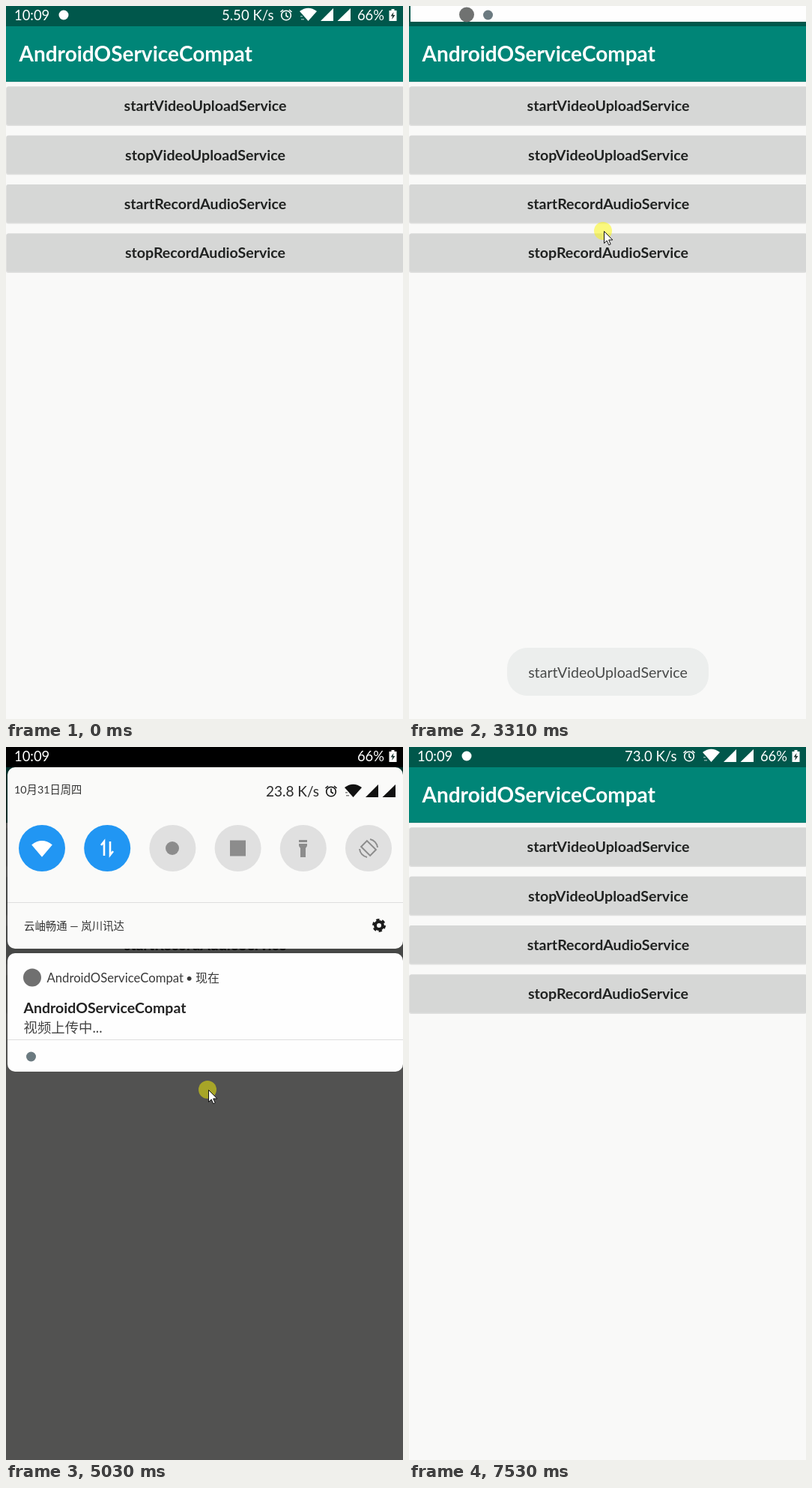
Recreate the animation shown at these times as an HTML page. Size 530x951 px, loop 8090 ms.

```html
<!DOCTYPE html>
<html lang="zh">
<head>
<meta charset="utf-8">
<style>
  html, body { margin: 0; width: 100%; height: 100%; overflow: hidden; background: #f9f9f8; }
  svg { display: block; width: 530px; height: 951px; }
  text { font-family: Lato, "Noto Sans CJK SC", "Noto Sans CJK", sans-serif; white-space: pre; }
  .bold { font-weight: 700; }
  .mid { text-anchor: middle; }
  .end { text-anchor: end; }
</style>
</head>
<body>
<svg viewBox="0 0 530 951" xmlns="http://www.w3.org/2000/svg">
  <defs>
    <path id="fan" d="M0 8.5L-11.5 -4.5Q0 -13 11.5 -4.5Z"/>
    <g id="signals">
      <g fill="none" stroke="currentColor" stroke-width="1.6">
        <circle cx="374" cy="12.5" r="6.3"/>
        <path d="M374 8.5V13L377 15M366.5 8L370 5M381.5 8L378 5"/>
      </g>
      <g fill="currentColor">
        <use href="#fan" x="403.5" y="11.5"/>
        <path d="M437 3V20H420ZM460 3V20H442.5Z"/>
        <path d="M393 13h3v1.5h-3zM394 17h4v1.5h-4z" opacity=".5"/>
      </g>
    </g>
    <g id="statusEnds" fill="#fff">
      <text x="11" y="19" font-size="18.4">10:09</text>
      <text x="505" y="19" font-size="18.4" class="end">66%</text>
      <path d="M514.5 4h4v2h3v14h-10V6h3z"/>
      <path d="M517.5 8l-4 5.5h2.5l-.8 4.500 4.300-6h-2.700z" fill="#243b37"/>
    </g>
    <clipPath id="buttonClip"><rect id="clipRect" x="1" width="530" height="51" rx="2"/></clipPath>
  </defs>

  <rect width="530" height="951" fill="#f9f9f8"/>
  <rect width="530" height="101" fill="#008577"/>
  <rect y="100" width="530" height="2" fill="#000" opacity=".08"/>
  <rect width="530" height="27" fill="#00574b"/>
  <text x="17.500" y="74" font-size="28" class="bold" fill="#fff">AndroidOServiceCompat</text>
  <g id="buttons"></g>
  <circle id="ripple" clip-path="url(#buttonClip)"/>

  <g id="toast">
    <rect x="131" y="856" width="269" height="64" rx="27" fill="#eceeed"/>
    <text x="265.500" y="896" font-size="19.600" class="mid" fill="#484a49">startVideoUploadService</text>
  </g>

  <g id="status">
    <use href="#statusEnds"/>
    <circle id="serviceIcon" cx="77" cy="12" r="9.500" fill="#12907f"/>
    <circle id="appIcon" cy="12" r="6.500" fill="#fff"/>
    <text id="speed" x="357.500" y="19" font-size="18.600" class="end" fill="#fff"></text>
    <use href="#signals" color="#fff"/>
  </g>

  <g id="strip">
    <rect width="530" height="27" fill="#00574b"/>
    <rect x="2" y="-8" width="528" height="29" fill="#fefefe"/>
    <circle cx="77" cy="11.500" r="10" fill="#707271"/>
    <circle cx="105.500" cy="12" r="6.500" fill="#6b7a80"/>
  </g>

  <rect id="dim" width="530" height="951"/>
  <g id="panel">
    <rect x="2" y="27" width="528" height="242" rx="10" fill="#fafaf9"/>
    <text x="11" y="61.500" font-size="14.300" fill="#333">10月31日周四</text>
    <text x="418" y="66" font-size="19" class="end" fill="#2a2a2a">23.8 K/s</text>
    <use href="#signals" x="60" y="47" color="#111"/>
    <g id="tiles"></g>
    <use href="#fan" transform="translate(48 136) scale(1.200 1.250)" fill="#fff"/>
    <path d="M131 145V126L127 131M139 126V144L143 139" fill="none" stroke="#fff" stroke-width="2.600"/>
    <g fill="#8c8c8c">
      <circle cx="222" cy="135" r="9"/>
      <rect x="299" y="124.500" width="21" height="21"/>
      <path d="M391 124h11v3h-11zM391 129h11v3l-2 3v12h-7v-12l-2-3z"/>
    </g>
    <g fill="none" stroke="#8c8c8c" stroke-width="2">
      <rect x="478.500" y="126.500" width="11" height="17" transform="rotate(-45 484 135)"/>
      <path d="M486 123A12.500 12.500 0 0 1 496 134M482 147A12.500 12.500 0 0 1 472 136"/>
    </g>
    <path d="M2 207.500H530" stroke="#dedede"/>
    <text x="24" y="243.500" font-size="14.400" fill="#333">云岫畅通 — 岚川讯达</text>
    <g fill="none" stroke="#1c1c1c">
      <circle cx="498" cy="238" r="5" stroke-width="4"/>
      <circle cx="498" cy="238" r="7.500" stroke-width="3" stroke-dasharray="4.200 3.654"/>
    </g>

    <rect id="card" x="2" y="275" width="528" rx="10" fill="#fefefe"/>
    <circle cx="35" cy="307.500" r="12" fill="#707070"/>
    <text x="54.500" y="314" font-size="16.700" fill="#3a3a3a">AndroidOServiceCompat</text>
    <text x="240" y="314" font-size="16" fill="#3a3a3a">•</text>
    <text x="253" y="314" font-size="16" fill="#3a3a3a">现在</text>
    <text x="23.500" y="355" font-size="19.500" class="bold" fill="#222">AndroidOServiceCompat</text>
    <text x="23.500" y="381" font-size="18.400" fill="#444">视频上传中...</text>
    <g id="shelf">
      <path d="M2 .5H530" stroke="#dedede"/>
      <circle cx="33.500" cy="23" r="6.500" fill="#6b7a80"/>
    </g>
  </g>
  <g id="panelStatus">
    <rect width="530" height="27"/>
    <use href="#statusEnds"/>
  </g>

  <g id="cursor">
    <circle id="press" cx="-1" r="12" fill="#fcf800" opacity=".5"/>
    <path d="M.5 .5V16.500L4.200 13L6.800 18.800L9.200 17.700L6.700 12H11.800Z" fill="#fff" stroke="#111"/>
  </g>
</svg>
<script>
const LOOP = 8090, TICK = 77.9, LEAD = 42, LAST_TICK = 97;
const $ = id => document.getElementById(id);
const set = (id, attrs) => {
  for (const key in attrs) $(id).setAttribute(key, attrs[key]);
};
const show = (id, visible) => set(id, { visibility: visible ? 'visible' : 'hidden' });
const within = (t, from, to) => t >= from && t < to;

// Linear interpolation through [tick, ...values] keys.
function track(keys, t) {
  const next = keys.findIndex(key => key[0] > t);
  if (next === 0) return keys[0].slice(1);
  if (next < 0) return keys[keys.length - 1].slice(1);
  const a = keys[next - 1], b = keys[next];
  const k = (t - a[0]) / (b[0] - a[0]);
  return a.slice(1).map((v, i) => v + (b[i + 1] - v) * k);
}

const cursorPath = [
  [1, 459, 918], [2, 400, 500], [3, 358, 203], [4, 358, 203], [6, 343, 175], [8, 327, 148], [10, 320, 138],
  [35, 320, 138], [36, 303, 95], [37, 268, 35], [38, 251, 5], [40, 251, 5],
  [41, 259, 8], [42, 259, 120], [43, 260, 300], [45, 260, 667], [46, 262, 740], [47, 265, 765],
  [60, 265, 765], [61, 266, 742], [63, 268, 620], [65, 270, 457], [67, 266, 290], [69, 262, 195], [71, 260, 175],
  [73, 260, 175], [74, 258, 167], [76, 295, 178], [78, 326, 191],
  [92, 326, 191], [93, 305, 240], [94, 262, 420], [95, 320, 640], [96, 443, 913]
];
const openness = [[43, 0], [44, .55], [45, 1], [65, 1], [66, .82], [67, .55], [68, .28], [69, .1], [70, 0]];
const shelfDrop = [[45, 28], [46, 18], [48, 4], [50, 0]];
const toastFade = [[26, 0], [30, 1], [52, 1], [59, 0]];
const taps = [{ at: 22, y: 107.5, cx: 320, cy: 138 }, { at: 81, y: 172.900, cx: 326, cy: 191 }];

$('buttons').innerHTML = ['startVideoUpload', 'stopVideoUpload', 'startRecordAudio', 'stopRecordAudio']
  .map((name, i) => {
    const y = 107.5 + i * 65.3;
    return `<rect x="0" y="${y}" width="531" height="52.500" rx="3" opacity=".1"/>
      <rect x="1" y="${y}" width="532" height="51" rx="2" fill="#d6d7d6"/>
      <text x="266" y="${y + 32.8}" font-size="19.600" class="bold mid" fill="#202221">${name}Service</text>`;
  }).join('');

$('tiles').innerHTML = Array.from({ length: 6 }, (_, i) =>
  `<circle cx="${48 + i * 87.2}" cy="135" r="31" fill="${i < 2 ? '#2196f3' : '#e0e0e0'}"/>`).join('');

function drawRipple(t) {
  const tap = taps.find(({ at }) => within(t, at + 1, at + 6));
  show('ripple', tap);
  if (!tap) return;
  const k = (t - tap.at) / 6;
  set('clipRect', { y: tap.y });
  set('ripple', { cx: tap.cx, cy: tap.cy, r: 360 * k, opacity: .16 * (1 - k) });
}

function drawPanel(t) {
  const [open] = track(openness, t);
  const [drop] = track(shelfDrop, t);
  show('strip', t === 43);
  show('panel', open > 0);
  show('panelStatus', open > 0);
  show('status', open === 0);
  set('panel', { transform: `translate(0 ${-(1 - open) * 430})` });
  set('dim', { opacity: .67 * open });
  set('card', { height: 158 + drop });
  set('shelf', { transform: `translate(0 ${390 + drop * .8})` });
}

function drawCursor(t) {
  const [x, y] = track(cursorPath, t);
  show('cursor', within(t, 1, LAST_TICK));
  const pressed = [[22, 24], [41, 45], [59, 69], [81, 83]].some(([from, to]) => within(t, from, to));
  set('press', { display: pressed ? 'inline' : 'none' });
  set('cursor', { transform: `translate(${Math.round(x)} ${Math.round(y)})` });
}

function draw(ms) {
  const t = Math.min(LAST_TICK, Math.floor((ms % LOOP + LEAD) / TICK));
  const running = within(t, 27, 84);
  set('serviceIcon', { display: running ? 'inline' : 'none' });
  set('appIcon', { cx: running ? 105.5 : 77 });
  $('speed').textContent = (t < 29 ? '5.50' : t < 76 ? '23.8' : '73.0') + ' K/s';
  set('toast', { opacity: track(toastFade, t)[0] });
  drawRipple(t);
  drawPanel(t);
  drawCursor(t);
}

const start = performance.now();
function loop() {
  draw(performance.now() - start);
  requestAnimationFrame(loop);
}
loop();
</script>
</body>
</html>
```
